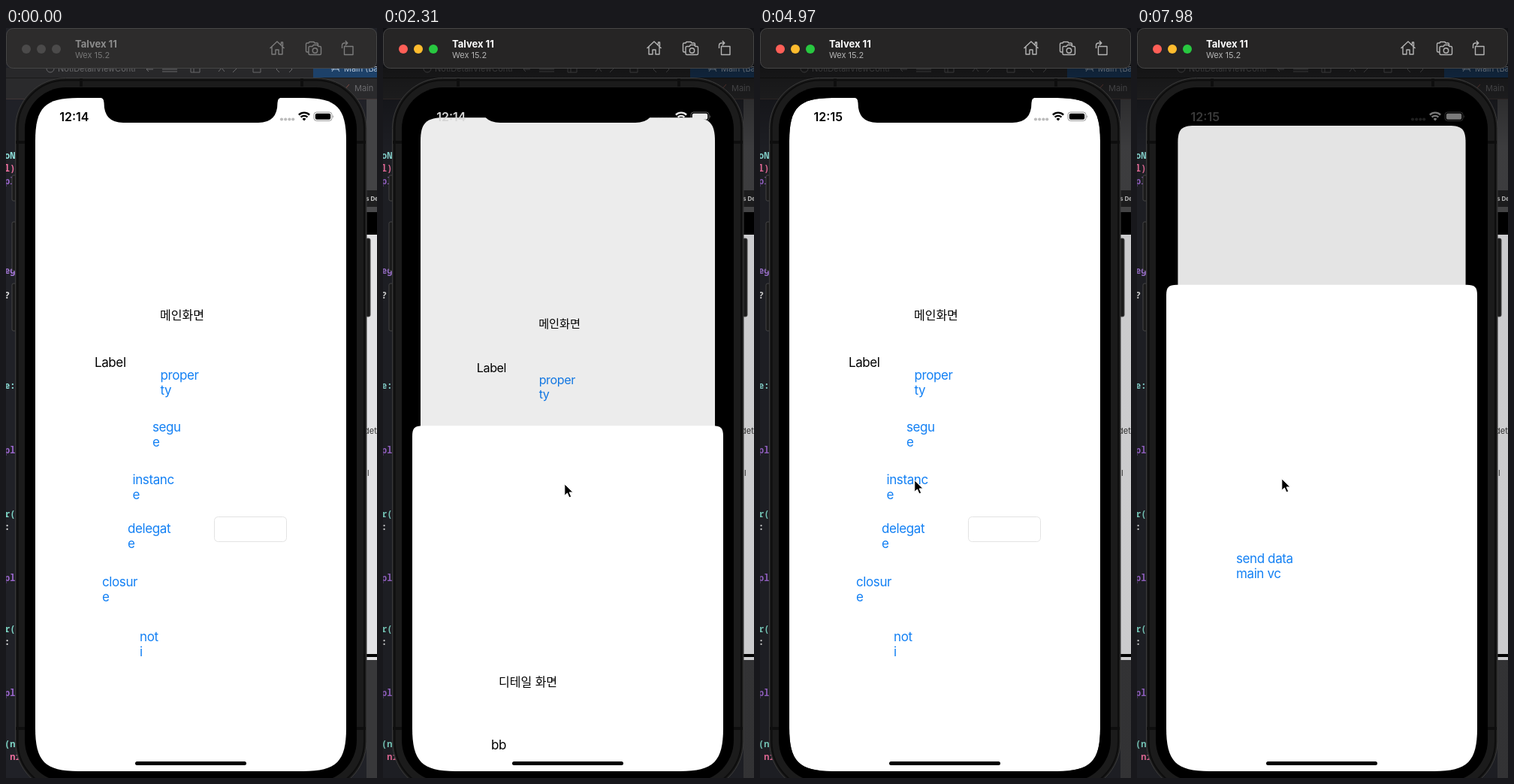
Write an HTML page that moves like this. It is 494 px wide and 998 px high and loops after 8000 ms.

```html
<!DOCTYPE html>
<html lang="ko">
<head>
<meta charset="utf-8">
<title>Simulator</title>
<style>
html, body { margin: 0; width: 100%; height: 100%; overflow: hidden; background: #1c1c1e; }
svg { display: block; width: 494px; height: 998px; }
text { font-family: Inter, "Noto Sans CJK KR", "Noto Sans CJK", sans-serif; white-space: pre; }
.ui text { font-size: 17px; letter-spacing: -.4px; }
.ui .ko { font-size: 16px; letter-spacing: 0; font-family: "Noto Sans CJK KR", "Noto Sans CJK", sans-serif; }
.btn { fill: #1380f4; }
.code text { font: 600 12px "Noto Sans Mono", "DejaVu Sans Mono", monospace; }
</style>
</head>
<body>
<svg id="stage" viewBox="0 0 494 998"></svg>
<script>
const LOOP = 8000, STEP = 70, TRAVEL = 839, SPRING = 0.0169;
const stage = document.getElementById('stage');

const clamp = v => Math.max(0, Math.min(1, v));
const rect = (x, y, w, h, fill, rest = '') =>
  `<rect x="${x}" y="${y}" width="${w}" height="${h}" fill="${fill}" ${rest}/>`;
const text = (x, y, str, rest = '') => `<text x="${x}" y="${y}" ${rest}>${str}</text>`;
const button = (id, x, y, lines) => `<g id="${id}" class="btn">` +
  lines.map((s, i) => text(x, y + 20 * i, s)).join('') + '</g>';

// Rounded rectangle with continuous corners.
function smooth(x, y, w, h, r) {
  const e = 1.4 * r, c = .315 * r, R = x + w, B = y + h;
  return `M${x} ${y + e}C${x} ${y + c} ${x + c} ${y} ${x + e} ${y}H${R - e}` +
    `C${R - c} ${y} ${R} ${y + c} ${R} ${y + e}V${B - e}` +
    `C${R} ${B - c} ${R - c} ${B} ${R - e} ${B}H${x + e}` +
    `C${x + c} ${B} ${x} ${B - c} ${x} ${B - e}z`;
}

const code = [
  [170, 'oN', '#8fe3dc'], [187, 'l)', '#f0709f'], [204, 'pl', '#9a66cc'], [323, 'eg', '#a578d8'],
  [356, '?', '#dcdcdc'], [476, 'e:', '#8fe3dc'], [562, 'pl', '#9a66cc'], [647, 'r(', '#7fd6c6'],
  [664, ':', '#dcdcdc'], [732, 'pl', '#9a66cc'], [800, 'r(', '#7fd6c6'], [817, ':', '#dcdcdc'],
  [885, 'pl', '#9a66cc'], [953, '(n', '#7fd6c6'], [970, ' ni', '#f0709f']
];

const backdrop = rect(0, 0, 494, 998, '#202127') +
  rect(0, 53, 494, 13, '#28282a') + rect(409, 53, 85, 13, '#1d4169') +
  rect(0, 66, 494, 29, '#2a2a2c') + rect(0, 94, 494, 1, '#403636') +
  rect(0, 66, 494, 1, '#191919') +
  `<g fill="#68686a" font-size="11">
    <circle cx="59" cy="54" r="5" fill="none" stroke="#68686a"/>
    ${text(69, 58, 'NotiDetailViewContr')}
    <path d="M187 55h9m-9 0 3-3m-3 3 3 3M208 55h20m-20 3h20M246 51h12v8h-12zM250 51v8M283 58l4-5 4 5M302 59l6-6M329 52h10v7h-10zM364 51l-4 4 4 4M377 51l4 4-4 4" fill="none" stroke="#68686a"/>
    <path d="M434 58l5-8 5 8M433 55h11" fill="none" stroke="#a9bdd4"/>
    ${text(450, 58, 'Main (Ba', 'fill="#b4c4d6"')}
    <path d="M449 84l8-9" stroke="#804c44"/>
    ${text(464, 84, 'Main', 'fill="#6a6a6d"')}
  </g>
  <g class="code">${code.map(([y, s, c]) => text(-2, y + 4, s, `fill="${c}"`)).join('')}</g>` +
  rect(480, 95, 14, 121, '#434345') + rect(480, 216, 14, 22, '#1f1f20') + rect(480, 238, 14, 7, '#4a4a4c') +
  rect(480, 245, 14, 30, '#000') + rect(480, 275, 14, 558, '#e2e2e4') + rect(480, 833, 14, 4, '#000') +
  rect(480, 837, 14, 4, '#e2e2e4') + rect(480, 841, 14, 157, '#38383a') +
  text(479, 230, 's De', 'font-size="8" font-weight="700" fill="#c8c8c8"') +
  text(477, 540, 'deta', 'font-size="11" fill="#333"') + text(481, 596, 'l', 'font-size="11" fill="#333"');

const sideKey = (x, y, h) => rect(x, y, 6, h, '#1a1a1a', 'rx="2" stroke="#454545"');
const body = sideKey(8, 196, 34) + sideKey(8, 258, 65) + sideKey(8, 340, 63) + sideKey(479, 280, 104) +
  rect(12.5, 66.5, 467.5, 950, '#1b1b1b', 'rx="67" stroke="#3b3b3b"') +
  rect(15.5, 69.5, 461.5, 944, 'none', 'rx="64" stroke="#0d0d0d" stroke-width="2"') +
  rect(98, 67, 4, 11, '#0e0e0e') + rect(392, 67, 4, 11, '#0e0e0e') +
  rect(13, 150, 12, 4, '#0e0e0e') + rect(467, 150, 12, 4, '#0e0e0e') +
  rect(13, 930, 12, 4, '#0e0e0e') + rect(467, 930, 12, 4, '#0e0e0e') +
  rect(25, 79, 442, 924, '#000', 'rx="55"');

const mainView = text(205, 388, '메인화면', 'class="ko"') +
  text(118, 450.5, 'Label', 'id="label"') +
  button('property', 205.5, 468, ['proper', 'ty']) +
  button('segue', 195, 537, ['segu', 'e']) +
  button('instance', 168.5, 607, ['instanc', 'e']) +
  button('delegate', 162, 672, ['delegat', 'e']) +
  button('closure', 128, 743, ['closur', 'e']) +
  button('noti', 178, 816, ['not', 'i']) +
  rect(277.5, 650.5, 96, 33, '#fff', 'rx="5" stroke="#e3e3e3"');

const sheets = `<g id="detailSheet">${text(154, 498, '디테일 화면', 'class="ko"')}${text(144, 582, 'bb')}</g>
  <g id="segueSheet">${text(136, 540, 'segue detail')}${text(157, 624.5, 'abcd')}</g>
  <g id="sendSheet">${button('send', 132, 521, ['send data', 'main vc'])}</g>`;

const statusBar = `<text id="clock" x="90.8" y="123.5" text-anchor="middle" font-size="16" font-weight="600"></text>
  <g id="icons">
    <g opacity=".26">${[367, 372.2, 377.4, 382.2].map(x => `<circle cx="${x}" cy="121.5" r="2.1"/>`).join('')}</g>
    <path d="M389.9 115.6a10 10 0 0 1 14.2 0M392.6 118.7a6.2 6.2 0 0 1 8.8 0" fill="none" stroke="currentColor" stroke-width="2.4"/>
    <path d="M394.6 121a3.4 3.4 0 0 1 4.8 0l-2.4 2.5z"/>
    <rect x="410" y="112" width="24" height="11.5" rx="3.5" fill="none" stroke="currentColor" opacity=".4"/>
    <rect x="411.8" y="113.8" width="20.4" height="8" rx="2"/>
    <path d="M435.3 115.8q1.6 2 0 4z" opacity=".5"/>
  </g>`;

const titleBar = rect(.5, .5, 493, 53, '#262525', 'id="bar" rx="9" stroke="#454545"') +
  [27, 47, 67].map(x => `<circle class="light" cx="${x}" cy="28" r="6"/>`).join('') +
  `<g id="title">${text(92, 26, 'Talvex 11', 'font-size="13" font-weight="700"')}</g>
  <g id="subtitle">${text(92, 40, 'Wex 15.2', 'font-size="11"')}</g>
  <g id="tools" fill="none" stroke-width="1.4" stroke-linejoin="round">
    <path d="M351.500 27 361 18l9.500 9M354 25v10h5v-6h4v6h5V25M366.500 22v-3h2v5"/>
    <path d="M403 32h-2q-1.500 0-1.500-1.500v-9q0-1.500 1.500-1.500h2l1-1.500h6l1 1.500h3q1.500 0 1.500 1.500v2"/>
    <path d="M404.500 24.500h3.500l1.500-2h5l1.500 2h2q1.500 0 1.500 1.500v8q0 1.500-1.500 1.500h-13.500q-1.500 0-1.500-1.500v-8q0-1.500 1.500-1.500z"/>
    <circle cx="411.500" cy="30" r="3.200"/>
    <path d="M450.500 24.500h11.500v11h-11.500zM447.500 27v-3.500q0-3.500 3.500-3.500h3.500M451.800 17l3 3-3 3"/>
  </g>`;

stage.innerHTML = `
  <defs>
    <clipPath id="screen"><path d="${smooth(39, 93, 414, 896, 41)}"/></clipPath>
    <linearGradient id="shadow" x2="0" y2="1">
      <stop offset=".05" stop-opacity=".5"/><stop offset=".16" stop-opacity=".1"/>
    </linearGradient>
  </defs>
  ${backdrop}
  ${rect(0, 0, 494, 998, 'url(#shadow)', 'id="shade"')}
  ${body}
  <g clip-path="url(#screen)" class="ui">
    ${rect(39, 93, 414, 896, '#000')}
    <g id="card">
      <path id="cardFace" fill="#fff"/>
      ${mainView}
      <path id="dim"/>
    </g>
    <g id="sheet"><path d="${smooth(39, 151, 414, 900, 10)}" fill="#fff"/>${sheets}</g>
  </g>
  ${statusBar}
  <path d="M124 92.500q6.500 0 6.500 7 0 26.500 25.500 26.500h180q25.500 0 25.500-26.500 0-7 6.500-7z"/>
  ${rect(172, 976, 148, 5, '#000', 'rx="2.5"')}
  ${titleBar}
  <path id="cursor" d="M.8.8v15.500l3.600-3.400 2.600 5.900 2.700-1.200-2.600-5.700h5z" fill="#000" stroke="#fff" stroke-width="1" stroke-linejoin="round"/>`;

const el = {};
stage.querySelectorAll('[id]').forEach(n => el[n.id] = n);
const lights = [...stage.querySelectorAll('.light')];

// Each visit: sheet, open time, release time, and where a drag began.
const visits = [
  { name: 'detail', open: 1123, drag: 1960, close: 2240 },
  { name: 'segue', open: 3333, drag: 4270, close: 4480 },
  { name: 'send', open: 5363, close: 6342 },
  { name: 'send', open: 7813, close: Infinity }
];
const PULL = 150;

const presses = [
  ['property', 1050, 1260], ['segue', 3220, 3430], ['instance', 5250, 5460],
  ['send', 6230, 6370], ['instance', 7700, 7910]
];

const path = [
  [70, 470, 960], [560, 241, 473], [630, 241, 473], [770, 239, 463], [840, 239, 463], [910, 238, 462],
  [1960, 238, 462], [2240, 242, 612], [2380, 240, 600], [2870, 206, 510], [2940, 206, 510],
  [3220, 212, 529], [4270, 212, 529], [4480, 214, 680], [4620, 213, 668], [4970, 205, 601],
  [5040, 205, 601], [5110, 200, 606], [5460, 200, 606], [6020, 187, 531], [6440, 187, 531],
  [6720, 178, 633], [6860, 176, 647], [7000, 176, 647], [7280, 185, 627], [7350, 185, 627],
  [7630, 192, 599], [8000, 192, 599]
];

// Critically damped spring: 1 at the start, 0 when settled.
const spring = ms => ms <= 0 ? 1 : (1 + SPRING * ms) * Math.exp(-SPRING * ms);

function sheetState(t) {
  const v = visits.filter(s => t >= s.open).pop();
  if (!v) return { offset: TRAVEL, light: 0, name: '' };
  const pull = v.drag ? PULL : 0;
  if (t >= v.close) return {
    offset: TRAVEL - (TRAVEL - pull) * spring(t - v.close),
    light: 1 - clamp((t - v.close - 30) / 250), name: v.name
  };
  const drag = v.drag ? pull * clamp((t - v.drag) / (v.close - v.drag)) : 0;
  return {
    offset: Math.max(drag, TRAVEL * spring(t - v.open)),
    light: clamp((t - v.open - 110) / 250), name: v.name
  };
}

function cursorAt(t) {
  const i = path.findIndex(p => p[0] > t);
  const [t0, x0, y0] = path[i - 1], [t1, x1, y1] = path[i];
  const k = (t - t0) / (t1 - t0);
  return [x0 + (x1 - x0) * k, y0 + (y1 - y0) * k];
}

const gray = k => { const v = Math.round(255 * k); return `rgb(${v},${v},${v})`; };

function draw(t) {
  const { offset, light, name } = sheetState(t);
  const p = 1 - offset / TRAVEL;
  const scale = (414 - 40 * p) / 414;
  el.card.setAttribute('transform',
    `translate(${39 + 20 * p} ${93 + 48 * p}) scale(${scale}) translate(-39 -93)`);
  const face = smooth(39, 93, 414, 896, p < .001 ? 0 : 41 - 31 * p);
  el.cardFace.setAttribute('d', face);
  el.dim.setAttribute('d', face);
  el.dim.setAttribute('opacity', .106 * clamp(p * 1.3));
  el.sheet.setAttribute('transform', `translate(0 ${offset})`);
  el.sheet.style.display = p < .0005 ? 'none' : '';
  for (const s of ['detail', 'segue', 'send'])
    el[s + 'Sheet'].style.display = s === name ? '' : 'none';

  el.label.textContent = t < 6370 ? 'Label' : 'some data';
  el.clock.textContent = t < 4340 ? '12:14' : '12:15';
  el.clock.setAttribute('fill', gray(light));
  el.icons.style.color = el.icons.style.fill = gray(Math.sqrt(light));

  for (const [id] of presses) el[id].setAttribute('opacity', 1);
  for (const [id, from, to] of presses)
    if (t >= from && t < to) el[id].setAttribute('opacity', .72);

  const active = t >= 1050;
  lights.forEach((n, i) =>
    n.setAttribute('fill', active ? ['#ff5f57', '#febc2e', '#28c840'][i] : '#4b4a4a'));
  el.bar.setAttribute('fill', active ? '#262525' : '#2d2c2c');
  el.title.setAttribute('fill', active ? '#fff' : '#8c8c8c');
  el.subtitle.setAttribute('fill', active ? '#b4b4b4' : '#777');
  el.tools.setAttribute('stroke', active ? '#b4b4b4' : '#7c7c7c');
  el.shade.setAttribute('opacity', active ? 1 : 0);

  el.cursor.style.display = t < 70 ? 'none' : '';
  if (t >= 70) el.cursor.setAttribute('transform', `translate(${cursorAt(t).join(' ')})`);
}

const start = performance.now();
function tick() {
  const t = (performance.now() - start) % LOOP;
  draw(Math.floor(t / STEP) * STEP);
  requestAnimationFrame(tick);
}
draw(0);
requestAnimationFrame(tick);
</script>
</body>
</html>
```
